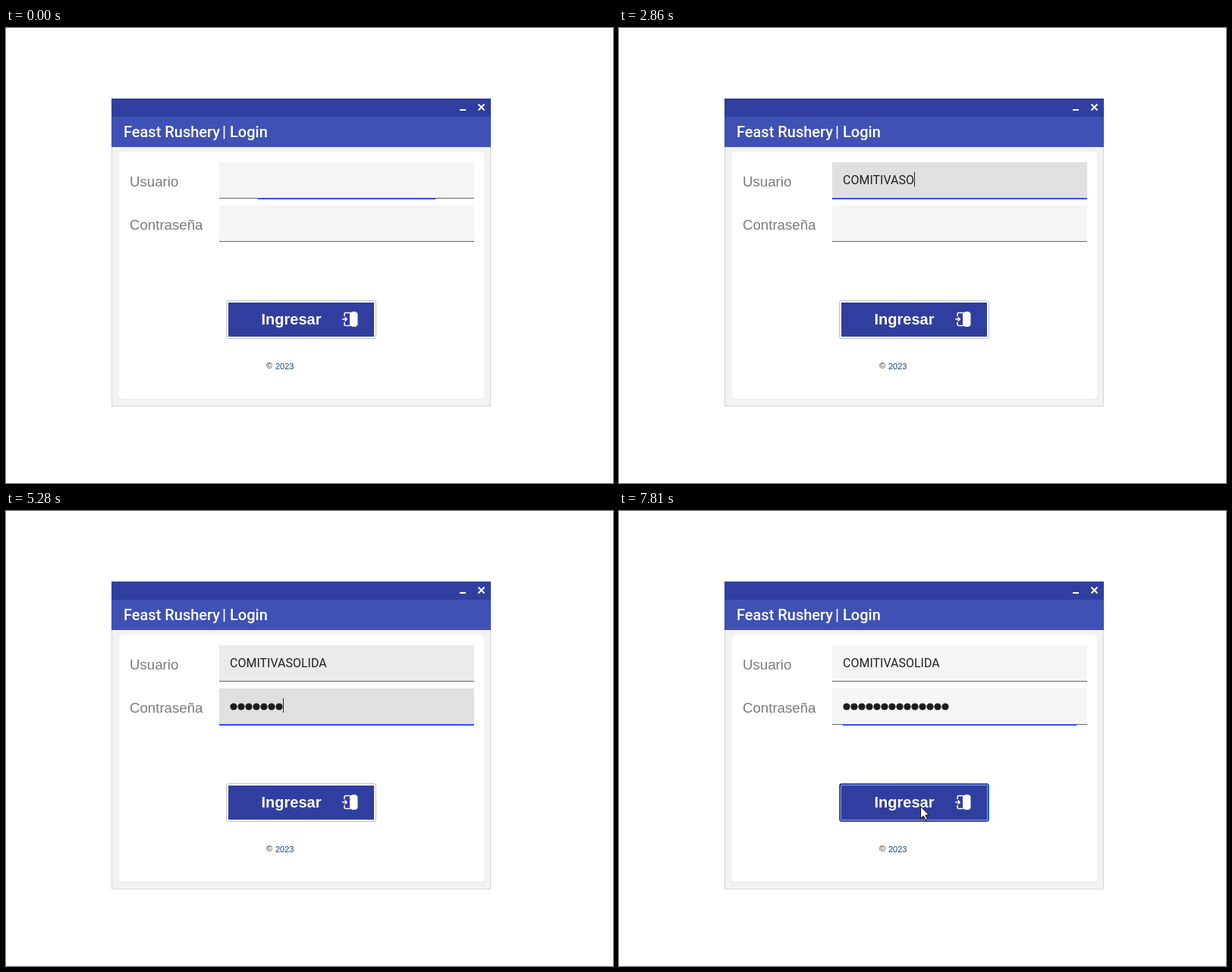
An HTML page that plays this animation: 800 px wide and 600 px high, repeating every 8000 ms.

```html
<!DOCTYPE html>
<html lang="es">
<head>
<meta charset="utf-8">
<title>Login</title>
<style>
  html, body { margin: 0; width: 100%; height: 100%; overflow: hidden; background: #fff; }
  svg { display: block; width: 800px; height: 600px; }
  .bar { font: 500 20px Roboto, sans-serif; fill: #fff; }
  .label { font: 18.67px "Liberation Sans", Arial, sans-serif; fill: #7a7a7c; }
  .entry { font: 16px Roboto, sans-serif; fill: #212121; }
  .button { font: bold 20px "Liberation Sans", Arial, sans-serif; fill: #fff; }
  .small { font: 11px "Liberation Sans", Arial, sans-serif; fill: #1f3f73; }
  .crisp { shape-rendering: crispEdges; }
</style>
</head>
<body>
<svg viewBox="0 0 800 600" xmlns="http://www.w3.org/2000/svg">
  <rect width="800" height="600" fill="#fff"/>
  <!-- window -->
  <rect x="139.5" y="93.5" width="499" height="405" fill="#f2f2f2" stroke="#d6d6d6"/>
  <g class="crisp">
    <rect x="139" y="93" width="500" height="24" fill="#303f9f"/>
    <rect x="139" y="117" width="500" height="40" fill="#3f51b5"/>
    <rect x="598" y="107" width="8" height="2" fill="#fff"/>
  </g>
  <path d="M622.5 100.5l8 8m0-8l-8 8" stroke="#fff" stroke-width="2"/>
  <text class="bar" x="155" y="144">Feast Rushery</text>
  <text class="bar" x="285" y="144">| Login</text>
  <rect x="149" y="163" width="481" height="327" rx="2" fill="#dadada"/>
  <rect x="149" y="163" width="481" height="326.5" rx="4" fill="#fff"/>
  <text class="label" x="163" y="209">Usuario</text>
  <text class="label" x="163" y="266">Contraseña</text>

  <g id="fields"></g>
  <text class="entry" id="user" x="295" y="206"></text>
  <g id="dots" fill="#1c1c1c"></g>
  <rect class="crisp" id="caret" width="1" height="19" fill="#222"/>

  <!-- button -->
  <rect id="frame" x="290.5" y="359.5" width="197" height="50" rx="2.5" fill="#fff" stroke="#c4c4c4"/>
  <rect class="crisp" x="293" y="362" width="192" height="45" fill="#303f9f"/>
  <g id="focus">
    <rect class="crisp" x="291" y="360" width="196" height="49" fill="#303f9f"/>
    <rect class="crisp" x="292.5" y="361.5" width="193" height="46" fill="none" stroke="#fff" stroke-dasharray="1 1"/>
  </g>
  <text class="button" x="336.5" y="391">Ingresar</text>
  <path d="M453 375.5h-5q-2 0-2 2v2.5m0 8v2.500q0 2 2 2h5" fill="none" stroke="#fff" stroke-width="1.6"/>
  <path d="M443 384h6m-2.500-2.800l2.800 2.800l-2.800 2.800" fill="none" stroke="#fff" stroke-width="1.5"/>
  <path d="M453 375.500l4-1.500h3q3.500 1 3.500 3.500v13q0 2.500-3.500 3.500h-3l-4-1.500z" fill="#fff"/>
  <text class="small" x="343" y="448.500" style="fill:#222">©</text>
  <text class="small" x="355" y="450">2023</text>

  <g id="arrow"><path d="M.5.5V16.500L4.300 13L7 18.500L9.400 17.500L6.900 12H11.500Z" fill="#fff" stroke="#111"/></g>
  <g id="beam"><path d="M-3-7.500h2.500l1 1l1-1h2.500M.5-6.500v14M-3 8h2.500l1-1l1 1h2.500" fill="none" stroke="#111"/></g>
</svg>
<script>
const LOOP = 8000;
const NAME = 'COMITIVASOLIDA';
const $ = id => document.getElementById(id);
const set = (el, attrs) => { for (const k in attrs) el.setAttribute(k, attrs[k]); };
const show = (el, on) => { el.style.display = on ? '' : 'none'; };

function make(tag, parent, attrs) {
  const el = document.createElementNS('http://www.w3.org/2000/svg', tag);
  set(el, attrs);
  return parent.appendChild(el);
}

// Moments at which a key adds one character
const userKeys = [1190, 1530, 1720, 1860, 1990, 2130, 2270, 2540, 2610, 2860, 3000, 3140, 3270, 3340];
const passKeys = [3880, 4210, 4680, 4810, 4950, 5080, 5280, 5480, 5540, 5800, 5940, 6000, 6070, 6270];

// Pointer stops: time, shape, x, y
const stops = [
  [0], [70, 'arrow', 568, 462], [130, 'arrow', 492, 380], [200, 'arrow', 402, 284],
  [260, 'arrow', 347, 226], [400, 'beam', 340, 196], [470, 'beam', 336, 183],
  [530, 'beam', 335, 173], [600, 'beam', 335, 178], [1190],
  [7010, 'beam', 336, 186], [7070, 'beam', 354, 285], [7140, 'arrow', 368, 366],
  [7200, 'arrow', 378, 428], [7270, 'arrow', 384, 446], [7340, 'arrow', 388, 440],
  [7410, 'arrow', 391, 426], [7470, 'arrow', 394, 411], [7540, 'arrow', 396, 399],
  [7610, 'arrow', 397, 392], [7680, 'arrow', 397, 390], [7740, 'arrow', 397, 389]
];

// The screen refreshes only at these moments
const ticks = [...userKeys, ...passKeys, ...stops.map(s => s[0]),
  670, 730, 3460, 3600, 3670, 3740, 3810, 6800, 7810].sort((a, b) => a - b);

const lastBefore = (list, t) => list.reduce((hit, s) => s <= t ? s : hit, 0);
const count = (keys, t) => keys.filter(k => k <= t).length;

// Underline share: a linear 250 ms ramp through a sine ease
const ease = v => {
  v = Math.min(1, Math.max(0, v));
  return v - Math.sin(v * 2 * Math.PI) / (2 * Math.PI);
};
const grow = (t, from) => ease((t - from) / 250);
const shrink = (t, from) => ease(1 - (t - from) / 250);

const fields = [177, 234].map(y => {
  const g = make('g', $('fields'), { class: 'crisp' });
  const back = make('rect', g, { x: 281, y, width: 336, height: 47 });
  make('rect', g, { x: 281, y: y + 47, width: 336, height: 1, fill: '#666' });
  const line = make('rect', g, { y: y + 47, height: 2, fill: '#304ffe' });
  return (fill, share) => {
    set(back, { fill });
    set(line, { x: 449 - 168 * share, width: 336 * share });
  };
});

const dots = userKeys.map((_, i) => make('circle', $('dots'), { cx: 300 + 10 * i, cy: 258, r: 4.6 }));

const IDLE = '#f5f5f5', HOVER = '#ebebeb', ACTIVE = '#e0e0e0';

function draw(time) {
  const t = lastBefore(ticks, time);
  const inUser = t >= 470 && t < 3600;
  const inPass = t >= 3600 && t < 7750;
  const hover = t >= 400 && t < 7010;

  const userLine = t < 400 ? shrink(t, -100) : t < 3600 ? grow(t, 470) : shrink(t, 3600);
  const passLine = t < 7750 ? grow(t, 3600) : shrink(t, 7750);
  fields[0](inUser ? ACTIVE : hover ? HOVER : IDLE, userLine);
  fields[1](inPass ? ACTIVE : IDLE, passLine);

  const typed = count(userKeys, t), hidden = count(passKeys, t);
  const user = $('user');
  user.textContent = NAME.slice(0, typed);
  dots.forEach((d, i) => show(d, i < hidden));

  const offset = inPass ? 10 * hidden : typed ? Math.round(user.getComputedTextLength()) : 0;
  set($('caret'), { x: 295 + offset, y: inPass ? 247 : 190 });
  show($('caret'), (inUser && t < 3460) || (inPass && t < 6800));

  const pressed = t >= 7750;
  show($('focus'), pressed);
  set($('frame'), { stroke: pressed ? '#0078d7' : '#c4c4c4' });

  const [, shape, x, y] = stops.filter(s => s[0] <= t).pop();
  for (const id of ['arrow', 'beam']) {
    show($(id), id === shape);
    if (id === shape) set($(id), { transform: `translate(${x} ${y})` });
  }
}

const start = performance.now();
function loop() {
  draw((performance.now() - start) % LOOP);
  requestAnimationFrame(loop);
}
loop();
</script>
</body>
</html>
```
